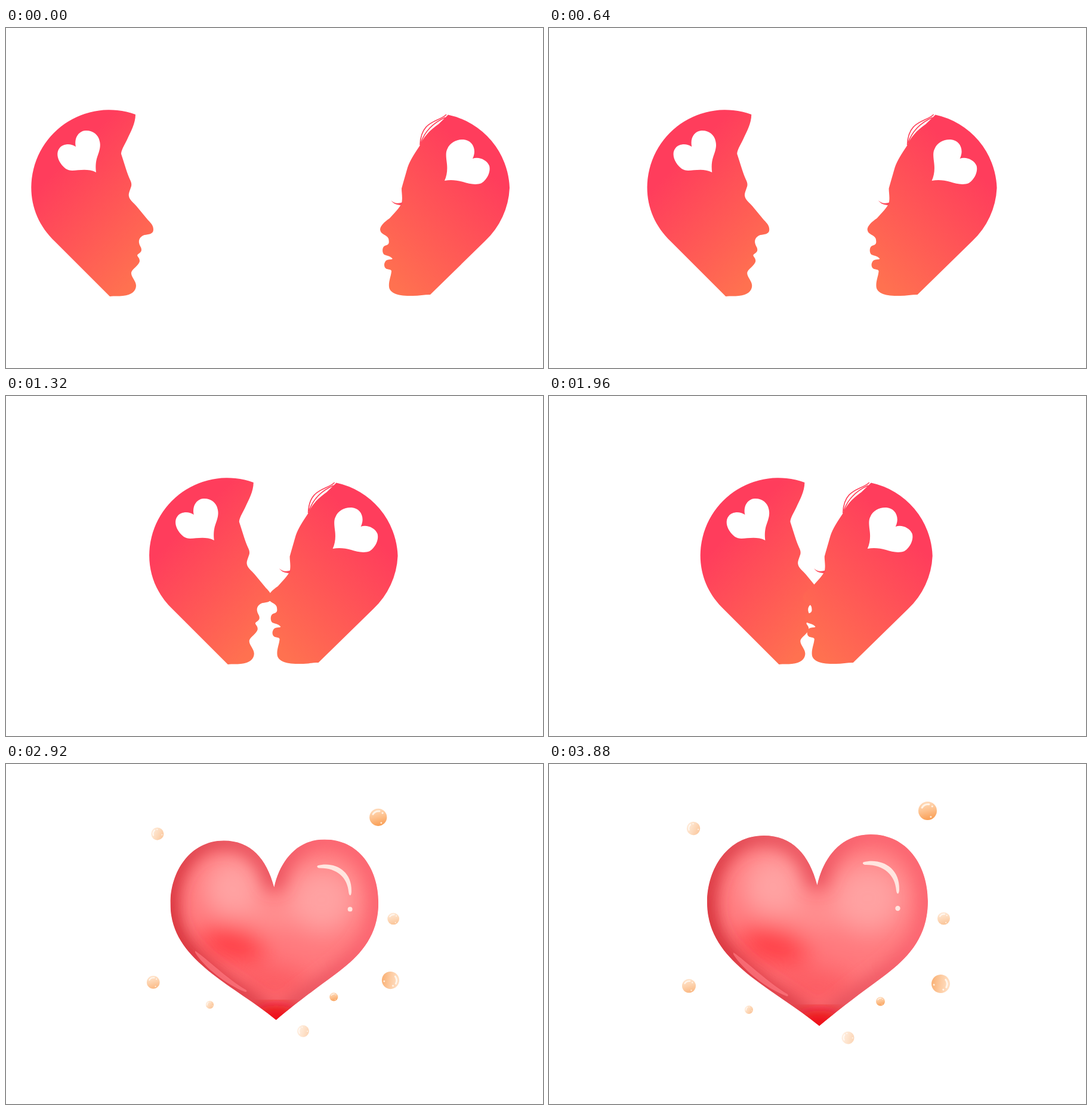
Write an HTML page that moves like this. It is 900 px wide and 570 px high and loops after 3.96 s.

```html
<!DOCTYPE html>
<html lang="en">
<head>
<meta charset="utf-8">
<title>Two heads become a heart</title>
<style>
  html, body { margin: 0; width: 100%; height: 100%; overflow: hidden; background: #fff; }
  svg { display: block; width: 900px; height: 570px; }
</style>
</head>
<body>
<svg viewBox="0 0 900 570">
  <defs>
    <linearGradient id="manFill" gradientUnits="userSpaceOnUse" x1="110" y1="210" x2="270" y2="370">
      <stop stop-color="#ff3d5c"/><stop offset="1" stop-color="#ff7150"/>
    </linearGradient>
    <linearGradient id="womanFill" gradientUnits="userSpaceOnUse" x1="785" y1="215" x2="610" y2="390">
      <stop stop-color="#ff3d5c"/><stop offset="1" stop-color="#ff7150"/>
    </linearGradient>
    <linearGradient id="rim" gradientUnits="userSpaceOnUse" x1="290" y1="330" x2="570" y2="200">
      <stop stop-color="#d32a34"/><stop offset=".5" stop-color="#e44f5a"/><stop offset="1" stop-color="#fb6370"/>
    </linearGradient>
    <linearGradient id="bubbleFill" x1=".35" y1="0" x2=".6" y2="1">
      <stop stop-color="#ffdcbd"/><stop offset=".5" stop-color="#fdc08c"/><stop offset="1" stop-color="#f99d52"/>
    </linearGradient>
    <filter id="soft" x="-60%" y="-60%" width="220%" height="220%"><feGaussianBlur stdDeviation="22"/></filter>
    <filter id="rimBlur" x="-20%" y="-20%" width="140%" height="140%"><feGaussianBlur stdDeviation="13"/></filter>
    <path id="heartShape" d="M449.5 203C436 152 408 120 360 120C300 120 265 175 265 232C265 290 300 325 338 356
      C375 385 415 408 453 439C490 408 520 386 558 358C600 327 635 292 635 230C635 170 600 118 539 118
      C490 118 460 156 449.5 203Z"/>
    <clipPath id="heartClip"><use href="#heartShape"/></clipPath>
  </defs>

  <g id="man">
    <path fill="url(#manFill)" d="M217 145A130.5 130.5 0 0 0 42.3 267C42.3 302 56 333 82 358L174 450
      C181 449 189 450 196 449C211 448 218 440 218 432C218 424 209 417 210 410C211 404 223 398 224 391
      C224 385 221 385 220 381C221 378 227 377 227 372C227 367 224 366 223 360C222 354 226 349 232 347
      C238 346 247 346 247 338C247 331 243 327 238 322L219 299C213 292 207 288 206 282C205 278 207 274 209 268
      C212 261 209 257 206 250C202 240 197 223 193 211C193 205 198 197 203 187C209 174 217 160 217 145Z"/>
    <path fill="#fff" d="M151 242C150 234 150 225 153 216C157 205 159 198 157 190C155 178 144 171 133 172
      C121 173 114 185 117 199C108 193 96 194 90 201C84 208 86 218 91 226C97 235 103 239 111 239
      C122 239 137 235 151 242Z"/>
  </g>

  <g id="woman">
    <path fill="url(#womanFill)" d="M741 145.500A130 130 0 0 1 844 268A130 130 0 0 1 803 357L711 447
      C701 447 692 449 682 449C656 450 643 444 642 434C641 425 645 417 646 408C646 405 643 405 638 404
      C633 402 633 395 636 391C639 387 645 389 648 387C645 383 640 382 634 380C630 377 630 367 635 365
      C641 363 643 362 641 353C638 346 628 347 627 338C627 332 634 325 643 319C650 311 660 301 663 294
      C665 284 663 277 663 269C666 258 669 248 673 234C677 222 685 210 693 198C699 184 709 172 725 161Z"/>
    <path fill="#ff4a5a" d="M645.500 289C650 294 657 295 665 292L663 297C656 297 649 295 645.500 289Z"/>
    <g fill="none" stroke="#ff4159" stroke-width="1.600">
      <path d="M738 145C726 158 695 154 694 196"/>
      <path d="M736 150C718 158 703 170 695 193"/>
    </g>
    <path fill="#fff" d="M735 256C739 247 740 238 739 228C738 218 736 209 740 202C744 192 756 186 767 187
      C781 188 790 203 782 219C792 215 806 221 810 231C813 242 805 255 797 260C787 264 776 261 766 258
      C756 255 745 254 735 256Z"/>
  </g>

  <g id="heart">
    <g clip-path="url(#heartClip)">
      <use href="#heartShape" fill="#ff797d"/>
      <g filter="url(#soft)">
        <ellipse cx="375" cy="205" rx="52" ry="55" fill="#ffa3a3"/>
        <ellipse cx="535" cy="225" rx="62" ry="60" fill="#ffa2a2"/>
        <ellipse cx="440" cy="255" rx="50" ry="20" fill="#ff9595"/>
        <ellipse cx="375" cy="305" rx="60" ry="32" fill="#ff3c44" transform="rotate(15 375 305)"/>
        <ellipse cx="450" cy="375" rx="65" ry="30" fill="#fc5a60"/>
      </g>
      <use href="#heartShape" fill="none" stroke="url(#rim)" stroke-width="30" filter="url(#rimBlur)"/>
      <ellipse cx="453" cy="437" rx="42" ry="24" fill="#f00812" filter="url(#rimBlur)"/>
    </g>
    <g fill="#ffe5df">
      <path d="M527 164.500C555 157 588 172 587 210C587 219 583 220 582 212C580 185 560 168 529 169Q524 167 527 164.500Z"/>
      <circle cx="584.500" cy="242" r="4.200"/>
    </g>
    <path fill="#ff7a82" opacity=".7" d="M309 316C330 330 365 365 400 386Q402 390 398 389C365 377 325 345 309 319Z"/>
    <g id="bubbles"></g>
  </g>
</svg>
<script>
const LOOP = 3960, STEP = 40, LAST = 3880;
const [man, woman, heart, bubbles] = ['man', 'woman', 'heart', 'bubbles'].map(id => document.getElementById(id));

// x, y, radius, opacity, turn
const bubbleSpecs = [
  [634.5, 78.5, 15.5, 1, 0], [656.5, 368.5, 15.5, .8, 110], [242, 108, 11.2, .55, -50], [661.5, 259, 10.5, .6, 0],
  [234.5, 372, 11.5, .72, 0], [335, 412, 7, .6, -40], [555.5, 398, 7.5, .95, 0], [501, 459, 10.5, .42, -60]
];
bubbles.innerHTML = bubbleSpecs.map(([x, y, r, alpha, turn]) =>
  `<g transform="translate(${x} ${y}) rotate(${turn}) scale(${r})" opacity="${alpha}">
    <circle r="1" fill="url(#bubbleFill)"/>
    <path d="M-.6 -.35Q-.35 -.75 .15 -.7" fill="none" stroke="#fff3e6" stroke-width=".2" stroke-linecap="round"/>
    <circle cx=".5" cy="-.48" r=".1" fill="#fff3e6"/>
    <circle cx=".35" cy=".65" r=".1" fill="#ffe9d2"/>
  </g>`).join('');

// [time, value] keys joined by straight lines
const manX = [[0, 0], [1000, 191], [2050, 213.3]];
const womanX = [[0, 0], [200, 13], [1000, -180.5], [2050, -203.2]];
const heartScale = [[2050, 0], [2755, 1.052], [2960, .916], [LAST, 1]];

function at(keys, t) {
  if (t <= keys[0][0]) return keys[0][1];
  const i = keys.findIndex(([time]) => time >= t);
  if (i < 0) return keys[keys.length - 1][1];
  const [t0, v0] = keys[i - 1], [t1, v1] = keys[i];
  return v0 + (v1 - v0) * (t - t0) / (t1 - t0);
}

function draw(now) {
  const t = Math.min(Math.floor(now % LOOP / STEP) * STEP, LAST);
  const scale = at(heartScale, t), showHeart = scale > 0;
  man.style.display = woman.style.display = showHeart ? 'none' : '';
  heart.style.display = showHeart ? '' : 'none';
  man.setAttribute('transform', `translate(${at(manX, t)} 0)`);
  woman.setAttribute('transform', `translate(${at(womanX, t)} 0)`);
  heart.setAttribute('transform', `translate(447.5 266) scale(${scale}) translate(-447.5 -266)`);
}

const start = performance.now();
function tick() {
  draw(performance.now() - start);
  requestAnimationFrame(tick);
}
tick();
</script>
</body>
</html>
```
